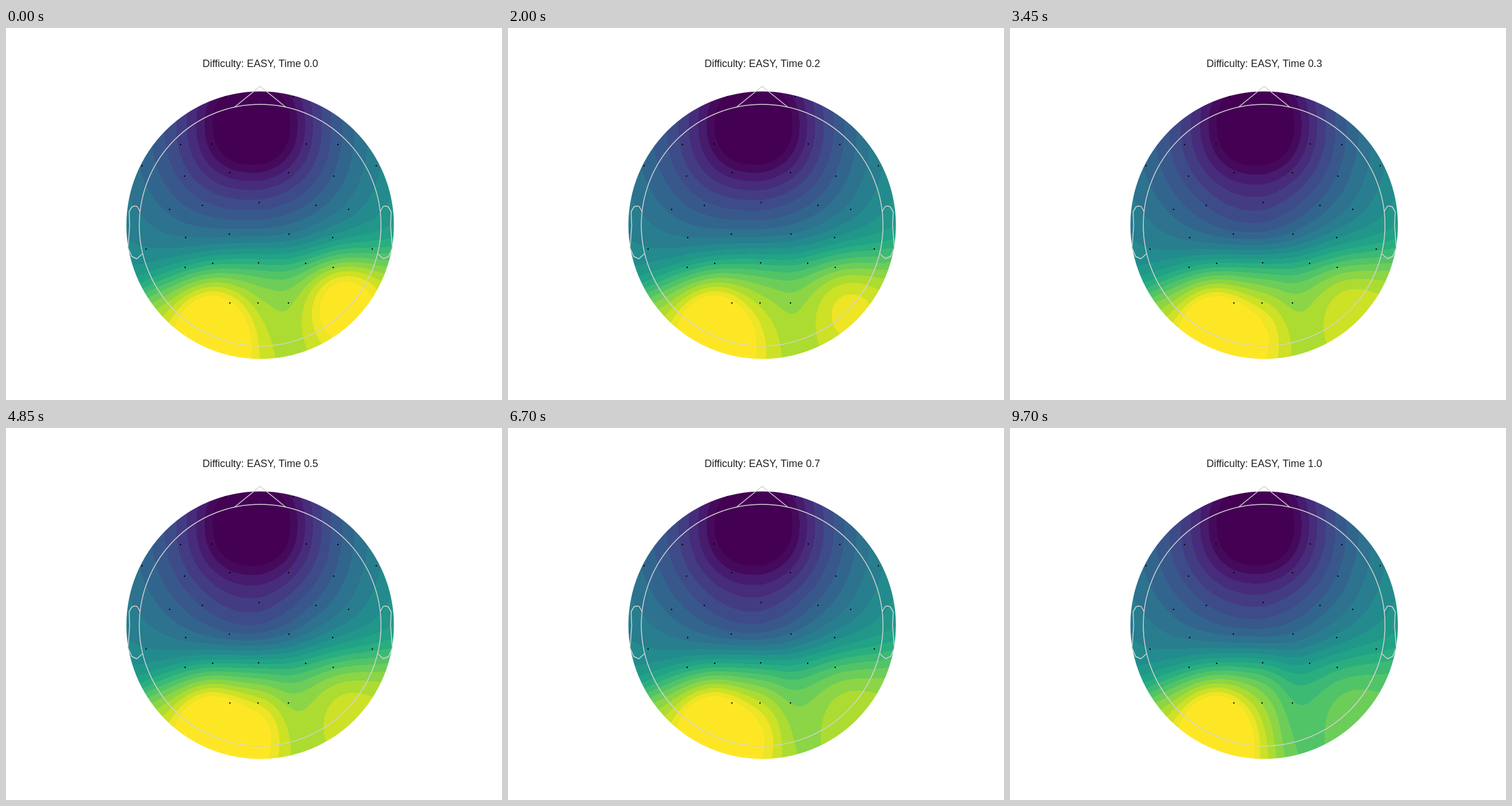
An HTML page with a canvas for the animation above (10000 ms loop, 864x648 px).

```html
<!DOCTYPE html>
<html lang="en">
<head>
<meta charset="utf-8">
<title>Scalp map</title>
<style>
  html, body { margin: 0; width: 100%; height: 100%; overflow: hidden; background: #fff; }
  canvas { display: block; }
</style>
</head>
<body>
<canvas id="stage" width="864" height="648"></canvas>
<script>
const ctx = document.getElementById('stage').getContext('2d');
const LOOP = 10000, STEP = 100, BANDS = 20;
const CX = 442.7, CY = 343.4, MAP_R = 233, HEAD_R = 210.5;
const LEFT = 208, TOP = 109, SIZE = 470;

// Viridis at every tenth.
const VIRIDIS = '440154 482475 414487 355f8d 2a788e 21918c 22a884 44bf70 7ad151 bddf26 fde725'
  .split(' ').map(h => [0, 2, 4].map(i => parseInt(h.substr(i, 2), 16)));

const clamp = (v, lo, hi) => Math.max(lo, Math.min(hi, v));
const sigmoid = x => 1 / (1 + Math.exp(-x));
const bump = (dx, dy, sx, sy) => Math.exp(-dx * dx / sx - dy * dy / sy);
const ease = (t, from, to) => {
  const p = clamp((t - from) / (to - from), 0, 1);
  return p * p * (3 - 2 * p);
};

// The map is a sum of fixed layers; u and v run from -1 to 1 across the disc.
const backRise = (u, v) => sigmoid(9.9 * (v - .237 - .35 * Math.min(u, 0) ** 2));
const layers = [
  { // low in front, rising to the back, with a high lobe at the back left
    weight: () => 1,
    value(u, v) {
      const distance = (Math.abs(u + .056) ** 2.3 + Math.abs(v + .75) ** 2.3) ** (1 / 2.3);
      return .6 * (1 - Math.exp(1.5 * (.3 - distance))) + .39 * backRise(u, v)
        + .07 * Math.max(u, 0) + .45 * bump(u + .36, v - .85, .057, .11);
    }
  },
  { // back right sinks late in the loop
    weight: t => -.08 - .14 * ease(t, 5.5, 9),
    value: (u, v) => sigmoid(14 * (u - .12)) * backRise(u, v)
  },
  { // right lobe fades
    weight: t => .07 + .19 * Math.exp(-t / 1.8),
    value: (u, v) => bump(u - .62, v - .57, .08, .12)
  },
  { // left lobe widens and narrows again
    weight: t => .13 * Math.sin(Math.PI * t / 10) ** 3,
    value: (u, v) => bump(u, v - .8, .04, .1)
  },
  { // centre dips
    weight: t => -.08 * ease(t, 1.8, 3.8) + .03 * ease(t, 6, 9),
    value: (u, v) => bump(u + .08, v - .08, .15, .12)
  }
];
for (const layer of layers) {
  layer.grid = new Float32Array(SIZE * SIZE).map((_, i) => layer.value(
    (LEFT + i % SIZE + .5 - CX) / MAP_R,
    (TOP + Math.floor(i / SIZE) + .5 - CY) / MAP_R));
}

// Index 0 lies below the first level, the last index above the top one.
const palette = new Uint32Array(BANDS + 2).map((_, i) => {
  const pos = clamp((i - .5) / BANDS, 0, 1) * 10, a = Math.min(9, Math.floor(pos));
  const [r, g, b] = VIRIDIS[a].map((c, ch) => Math.round(c + (VIRIDIS[a + 1][ch] - c) * (pos - a)));
  return (255 << 24 | b << 16 | g << 8 | r) >>> 0;
});

const map = document.createElement('canvas');
map.width = map.height = SIZE;
const mapCtx = map.getContext('2d');
const image = mapCtx.createImageData(SIZE, SIZE);
const pixels = new Uint32Array(image.data.buffer);
const field = new Float32Array(SIZE * SIZE);

function paintMap(seconds) {
  field.fill(0);
  for (const { weight, grid } of layers) {
    const w = weight(seconds);
    for (let i = 0; i < field.length; i++) field[i] += w * grid[i];
  }
  for (let i = 0; i < field.length; i++) {
    pixels[i] = palette[clamp(Math.floor(field[i] * BANDS) + 1, 0, BANDS + 1)];
  }
  mapCtx.putImageData(image, 0, 0);
}

// Left half only; the right half is its mirror image.
const SENSORS = [[382, 120], [304, 203], [359, 202], [237, 240], [311, 258], [390, 252], [285, 316],
  [342, 309], [313, 365], [389, 359], [244, 385], [312, 417], [360, 410], [390, 479]];
const MIDLINE = [[441, 304], [440, 409], [439, 479]];
const EAR = [[233.5, 320], [228.5, 311], [224, 310], [219.5, 311.5], [214.5, 320], [215.5, 345],
  [212.5, 383], [219, 398], [228, 402], [238, 393]];
const NOSE = [[398.5, 137.5], [442.7, 101.5], [487, 137.5]];
const mirror = (points, axis) => points.map(([x, y]) => [2 * axis - x, y]);

function polyline(points) {
  ctx.beginPath();
  points.forEach(([x, y]) => ctx.lineTo(x, y));
  ctx.stroke();
}

function disc(x, y, r) {
  ctx.beginPath();
  ctx.arc(x, y, r, 0, 2 * Math.PI);
}

function draw(label) {
  ctx.fillStyle = '#fff';
  ctx.fillRect(0, 0, 864, 648);

  ctx.save();
  disc(CX, CY, MAP_R);
  ctx.clip();
  ctx.drawImage(map, LEFT, TOP);
  ctx.restore();

  ctx.fillStyle = '#000';
  for (const [x, y] of [...SENSORS, ...mirror(SENSORS, 441), ...MIDLINE]) {
    disc(x, y, 1.2);
    ctx.fill();
  }

  ctx.strokeStyle = '#d3d3d3';
  ctx.lineWidth = 1.5;
  ctx.lineJoin = 'round';
  disc(CX, CY, HEAD_R);
  ctx.stroke();
  polyline(NOSE);
  polyline(EAR);
  polyline(mirror(EAR, CX));

  ctx.fillStyle = '#222';
  ctx.font = '17.9px "Liberation Sans", Arial, sans-serif';
  ctx.textAlign = 'center';
  ctx.fillText('Difficulty: EASY, Time ' + label, 443, 68);
}

let shown = -1;
function tick() {
  const t = Math.floor(performance.now() % LOOP / STEP) * STEP;
  if (t !== shown) {
    paintMap(t / 1000);
    draw((Math.round(t / 1000) / 10).toFixed(1));
    shown = t;
  }
  requestAnimationFrame(tick);
}
tick();
</script>
</body>
</html>
```
